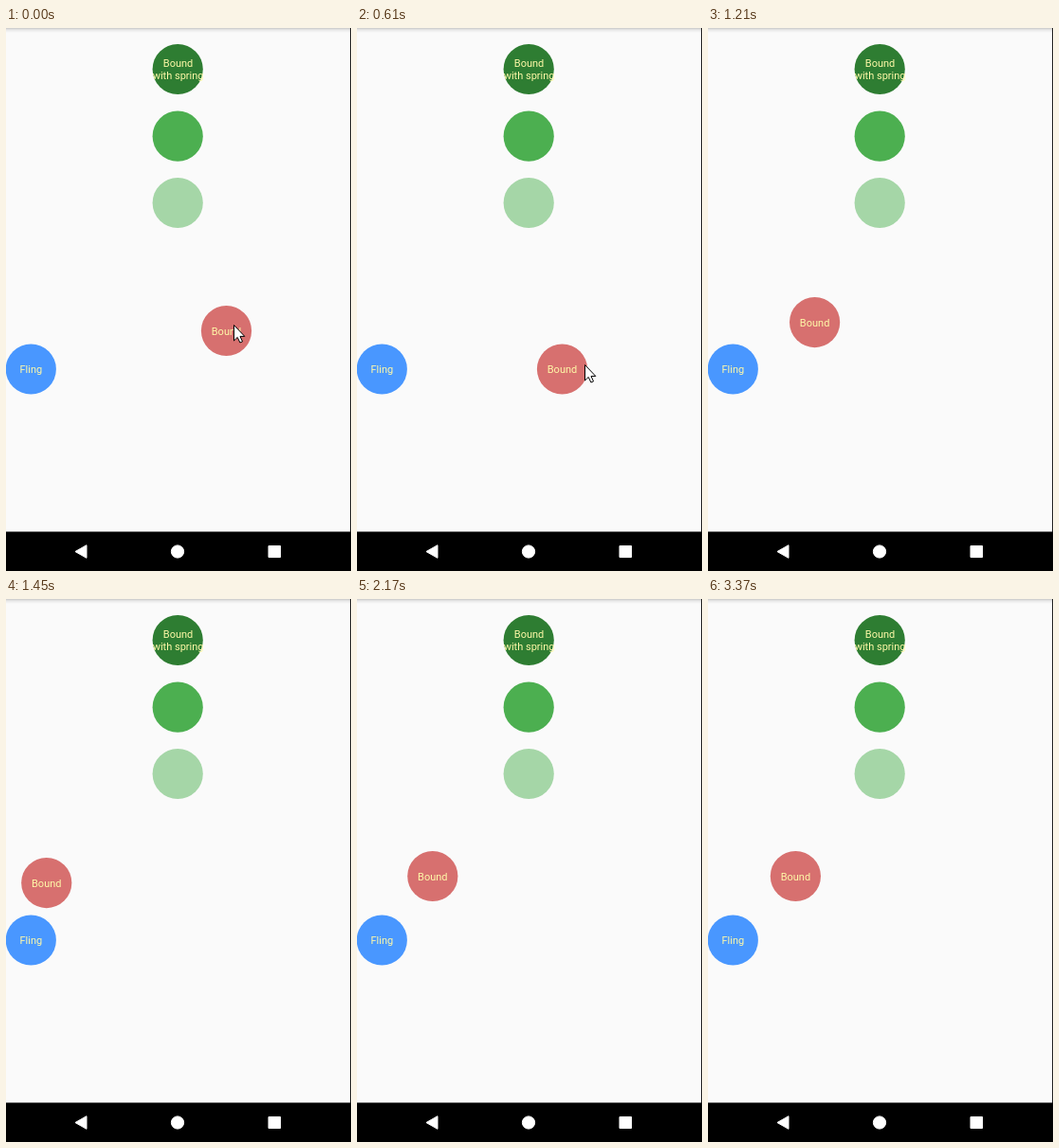
Write an HTML page that moves like this. It is 364 px wide and 573 px high and loops after 4.3 s.

```html
<!DOCTYPE html>
<html lang="en">
<head>
<meta charset="utf-8">
<title>Bounded fling</title>
<style>
  html, body { margin: 0; width: 100%; height: 100%; overflow: hidden; background: #fafafa; }
  svg { display: block; }
  text { font: 11px Roboto, sans-serif; fill: #fff9a8; text-anchor: middle; }
</style>
</head>
<body>
<svg width="364" height="573" viewBox="0 0 364 573">
  <defs>
    <linearGradient id="shade" x2="0" y2="1">
      <stop stop-color="#c8c8c8"/>
      <stop offset=".4" stop-color="#e8e8e8"/>
      <stop offset="1" stop-color="#fafafa"/>
    </linearGradient>
  </defs>
  <rect width="364" height="573" fill="#fafafa"/>
  <rect width="364" height="5" fill="url(#shade)"/>
  <rect x="363" width="1" height="573" fill="#222"/>

  <circle cx="181.2" cy="184.5" r="26.6" fill="#a5d6a7"/>
  <circle cx="181.2" cy="114.2" r="26.6" fill="#4caf50"/>
  <circle cx="181.2" cy="43.5" r="26.6" fill="#2e7d32"/>
  <text x="181.6" y="41">Bound</text>
  <text x="181.6" y="54">with spring</text>

  <circle cx="26.3" cy="360" r="26.6" fill="#4997ff"/>
  <text x="26.3" y="364">Fling</text>

  <g id="ball">
    <circle r="26.6" fill="#d7706f"/>
    <text y="4.2">Bound</text>
  </g>

  <rect y="531.5" width="364" height="42" fill="#000"/>
  <g fill="#fff" stroke="#fff" stroke-linejoin="round">
    <path d="M73 552.5L85 545.7V559.3Z"/>
    <circle cx="181" cy="552.5" r="6.6"/>
    <rect x="277" y="546.5" width="12.5" height="12"/>
  </g>

  <path id="cursor" d="M.5 .5V17L4.2 13.4L6.9 19L9.5 17.9L7 12.4H11.8Z" fill="#fff" stroke="#000"/>
</svg>
<script>
const LOOP = 4300, STEP = 60;
const LEFT = 26.5, RIGHT = 337;  // limits for the ball's centre
const REST = 93;                 // where the ball comes to rest
const LAUNCH = 790, WALL = 910;  // fling begins, ball has met the right wall
const FRICTION = 0.00255;        // per ms

const ball = document.getElementById('ball');
const cursor = document.getElementById('cursor');

// Point on a quadratic curve from a to b, pulled towards c
const curve = (a, c, b, p) =>
  a.map((v, i) => v * (1 - p) ** 2 + 2 * c[i] * p * (1 - p) + b[i] * p * p);

const progress = (t, from, to) => Math.min(1, Math.max(0, (t - from) / (to - from)));

function ballAt(t) {
  if (t < LAUNCH) return curve([232.5, 319.5], [243, 299.5], [216.5, 360], progress(t, 0, 550));
  const skip = t > WALL ? 42 : 0;
  const travel = 365 * Math.exp(-FRICTION * (t - WALL + skip));
  let x = Math.abs(REST - LEFT - travel) + LEFT;
  if (x > RIGHT) x = 2 * RIGHT - x;
  const y = 286.5 + 0.1576 * travel;
  return [x, Math.min(360, Math.max(292.5, y))];
}

function cursorAt(t) {
  if (t < 610) return curve([240, 313], [250, 299], [240, 355], progress(t, 0, 610));
  if (t < WALL) return curve([240, 355], [250, 355], [348, 350], progress(t, 610, 850));
  if (t >= 2470 && t < 2650) return curve([352, 375], [150, 425], [59, 436], progress(t, 2470, 2650));
  if (t >= 2650 && t < 3370) return curve([59, 436], [365, 470], [206, 567], progress(t, 2650, 3280) ** 2);
  return null;
}

function place(el, point) {
  el.style.display = point ? '' : 'none';
  if (point) el.setAttribute('transform', `translate(${point})`);
}

function draw(now) {
  const t = Math.max(0, Math.floor((now % LOOP - 10) / STEP) * STEP + 10);
  place(ball, ballAt(t));
  place(cursor, cursorAt(t));
}

const start = performance.now();
function tick() {
  draw(performance.now() - start);
  requestAnimationFrame(tick);
}
tick();
</script>
</body>
</html>
```
